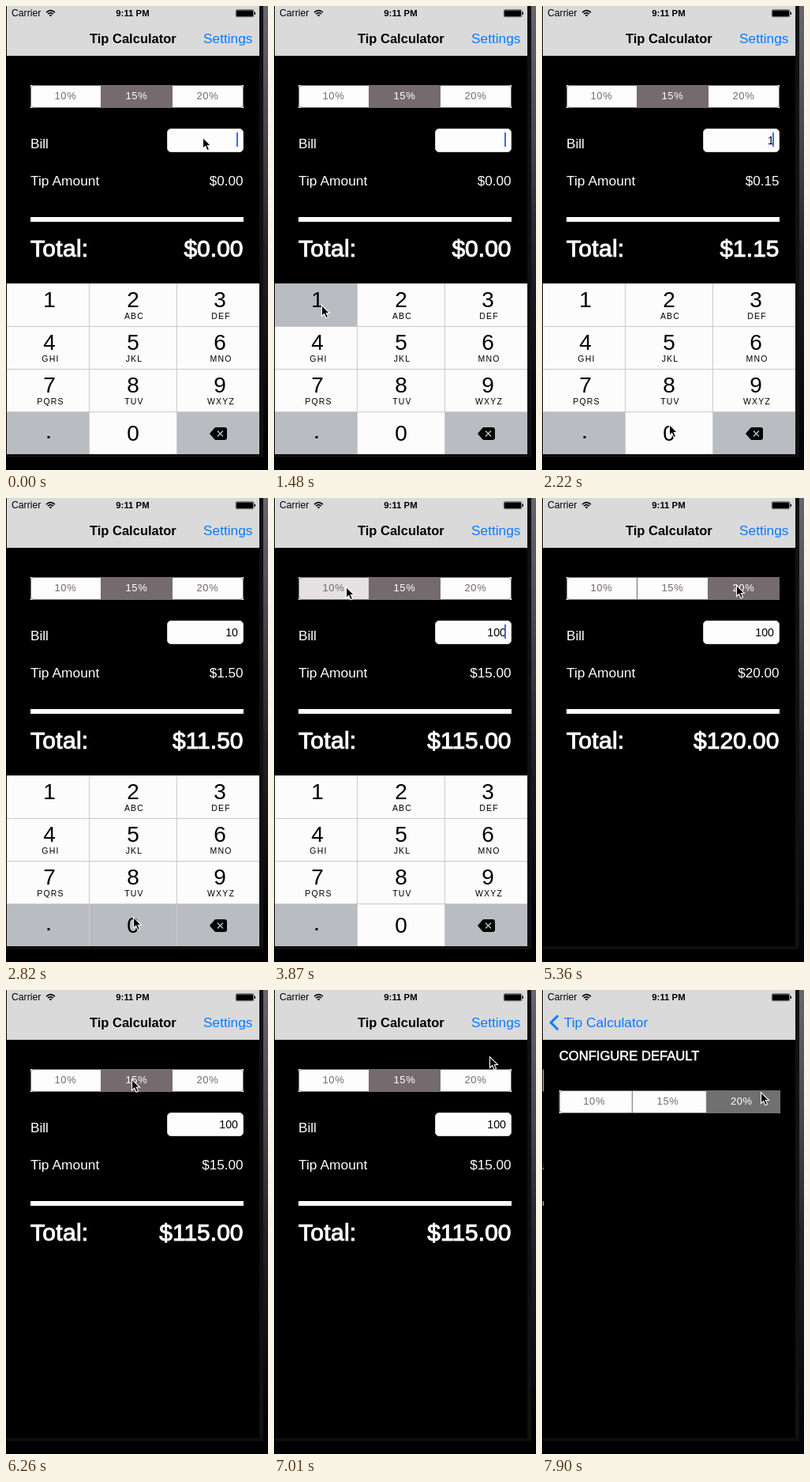
Recreate the animation shown at these times as an HTML page. Size 332x587 px, loop 8 s.

```html
<!DOCTYPE html>
<html lang="en">
<head>
<meta charset="utf-8">
<title>Tip calculator</title>
<style>
  html, body { margin: 0; width: 100%; height: 100%; overflow: hidden; background: #000; }
  svg { display: block; width: 100%; height: 100%; font-family: "Liberation Sans", Arial, sans-serif; }
</style>
</head>
<body>
<svg id="stage" viewBox="0 0 332 587"></svg>
<script>
const LOOP = 8000, STEP = 149, LEAD = 16;
const BLUE = '#0a7aff', KEY_GRAY = '#b9bcc1';
const RATES = [10, 15, 20];

// Pointer path: [step, x, y]
const POINTER = [
  [0, 249, 166], [6, 249, 166], [10, 60, 378], [12, 58, 376], [14, 140, 540], [15, 161, 529],
  [21, 161, 530], [26, 91, 112], [27, 92, 114], [28, 104, 128], [31, 246, 110], [36, 246, 110],
  [40, 158, 112], [44, 160, 113], [47, 273, 84], [49, 283, 46], [51, 284, 48], [53, 277, 129]
];
const TYPED = [[11, '1'], [17, '0'], [20, '0']];
const KEYBOARD_DROP = [[26, 0], [27, 105], [28, 209], [29, 213], [30, 216]];

const mix = (a, b, p) => a + (b - a) * p;
const smooth = p => p * p * (3 - 2 * p);

function along(path, k, ease = p => p) {
  const i = path.findIndex(point => point[0] >= k);
  if (i < 0) return path.at(-1).slice(1);
  if (i === 0) return path[0].slice(1);
  const [from, to] = [path[i - 1], path[i]];
  const p = ease((k - from[0]) / (to[0] - from[0]));
  return from.slice(1).map((v, n) => mix(v, to[n + 1], p));
}

const rect = (x, y, w, h, fill, extra = '') =>
  `<rect x="${x}" y="${y}" width="${w}" height="${h}" fill="${fill}" ${extra}/>`;
const text = (x, y, size, fill, str, extra = '') =>
  `<text x="${x}" y="${y}" font-size="${size}" fill="${fill}" ${extra}>${str}</text>`;
// A medium weight: regular letters thickened by a thin outline
const medium = (x, y, size, fill, str, extra = '') =>
  text(x, y, size, fill, str, `stroke="${fill}" stroke-width="${size * .035}" ${extra}`);
const shift = (x, y, body) => `<g transform="translate(${x} ${y})">${body}</g>`;
const BOLD = 'font-weight="bold"', END = 'text-anchor="end"', MID = 'text-anchor="middle"';

function segments(x, y, cuts, tint, selected, pressed) {
  const width = cuts[3];
  let out = rect(x, y, width, 29, '#fdfdfd');
  RATES.forEach((rate, i) => {
    const on = rate === selected;
    const w = cuts[i + 1] - cuts[i];
    if (on || rate === pressed) out += rect(x + cuts[i], y, w, 29, on ? tint : '#e5e1e3');
    if (i) out += rect(x + cuts[i] - 1, y, 1, 29, tint);
    out += text(x + 44.4 + i * width / 3, y + 18, 13, on ? '#fff' : tint, rate + '%', `${MID} letter-spacing=".6"`);
  });
  return out + rect(x + .5, y + .5, width - 1, 28, 'none', `rx="3.5" stroke="${tint}"`);
}

function calculator(k) {
  const typed = TYPED.filter(([at]) => at <= k);
  const bill = typed.map(([, digit]) => digit).join('');
  const lastKey = typed.length ? typed.at(-1)[0] : 0;
  const rate = k < 27 ? 15 : k < 35 ? 10 : k < 42 ? 20 : 15;
  const pressed = { 26: 10, 34: 20, 41: 15 }[k];
  const caret = k < 27 && Math.floor((k - lastKey + 2) / 3) % 2 === 0;
  const tip = bill * rate / 100;
  const money = v => '$' + v.toFixed(2);
  return segments(31, 100, [0, 90, 180, 270], '#756a6e', rate, pressed)
    + text(31, 180, 17.2, '#fff', 'Bill')
    + rect(204.5, 155.5, 96, 29, '#fdfdfd', 'rx="4.5" stroke="#cfcfcf"')
    + text(294, 175, 14.2, '#000', bill, END)
    + (caret ? rect(292, 160, 2, 18, '#3f6be0') : '')
    + text(31, 227, 17.4, '#fff', 'Tip Amount')
    + text(300.5, 227, 17.1, '#fff', money(tip), END)
    + rect(31, 267, 270, 6, '#fff')
    + medium(31, 317, 30, '#fff', 'Total:', 'letter-spacing=".3"')
    + medium(300.5, 317, 30, '#fff', money(+bill + tip), END);
}

function keyboard(k) {
  const letters = ['', 'ABC', 'DEF', 'GHI', 'JKL', 'MNO', 'PQRS', 'TUV', 'WXYZ'];
  const left = [1, 106, 217], width = [104, 110, 104], centre = [55, 161, 271];
  const down = [10, 11].includes(k) ? 0 : [16, 17, 19, 20].includes(k) ? 10 : -1;
  let out = rect(1, 351, 320, 216, '#c9cacc');
  for (let i = 0; i < 12; i++) {
    const col = i % 3, row = Math.floor(i / 3), y = 351 + row * 54;
    const gray = i === 9 || i === 11 || i === down;
    out += rect(left[col], y + (row ? 1 : 0), width[col], row ? 53 : 54, gray ? KEY_GRAY : '#fcfcfc');
    if (i < 9) {
      out += text(centre[col], y + 30, 28, '#000', i + 1, MID)
        + text(centre[col] + 1.5, y + 45, 10.5, '#000', letters[i], `${MID} letter-spacing="1.2"`);
    }
  }
  return out
    + text(161, 550, 28, '#000', 0, MID)
    + rect(52.5, 544, 3, 3, '#000')
    + '<path d="M258 541l6-7q1-1 2-1h11q3 0 3 3v10q0 3-3 3h-11q-1 0-2-1z"/>'
    + `<path d="M268 537.5l7 7m0-7l-7 7" stroke="${KEY_GRAY}" stroke-width="1.5"/>`;
}

function settings() {
  return rect(1, 63, 320, 504, '#000')
    + medium(21, 89, 16.6, '#fff', 'CONFIGURE DEFAULT')
    + segments(21, 127, [0, 93, 187, 280], '#707070', 20);
}

function bars(k, p) {
  const fade = v => `opacity="${v}"`;
  const titleX = mix(106, 27.5, p);
  return rect(1, 0, 320, 63, '#dadada')
    + text(7, 13.3, 12.2, '#000', 'Carrier')
    + '<g fill="none" stroke="#000" stroke-width="1.6"><path d="M51 8.2q5.5-5 11 0M53 10.2q3.5-3 7 0"/></g>'
    + '<path d="M54.7 11.4q1.8-1.3 3.6 0l-1.8 2z"/>'
    + text(160.5, 13.3, 11.4, '#000', '9:11 PM', `${BOLD} ${MID}`)
    + rect(291.3, 4.8, 22.6, 8.9, 'none', 'rx="1.5" stroke="#000" stroke-width=".6"')
    + rect(292, 5.6, 21, 7.4, '#000', 'rx="1"') + rect(314.5, 7.5, 1.5, 3.5, '#000', 'rx=".7"')
    + text(titleX, 47, 16.5, '#000', 'Tip Calculator', `${BOLD} ${fade(1 - p)}`)
    + text(250, 47, 17.3, BLUE, 'Settings', fade(k === 49 || k === 50 ? .3 : 1 - p))
    + text(titleX, 47, 17.4, BLUE, 'Tip Calculator', fade(p))
    + `<path d="M20.3 32.3l-9 9 9 9" fill="none" stroke="${BLUE}" stroke-width="3" ${fade(p)}/>`;
}

const DEFS = `<defs>
  <clipPath id="screen"><rect x="1" y="0" width="320" height="567"/></clipPath>
  <linearGradient id="edge" x2="0" y2="1">
    <stop stop-color="#66666c"/><stop offset=".25" stop-color="#4a4a50"/>
    <stop offset=".55" stop-color="#222226"/><stop offset="1" stop-color="#000"/>
  </linearGradient></defs>`;

function scene(k) {
  const pushTime = k * STEP - 7508;
  const offset = pushTime < 0 ? 320 : 320 * Math.exp(-pushTime / 65);
  const p = 1 - offset / 320;
  const [drop] = along(KEYBOARD_DROP, k);
  const [x, y] = along(POINTER, k, smooth);
  return DEFS
    + rect(0, 0, 332, 587, '#000')
    + rect(326, 0, 6, 567, 'url(#edge)')
    + rect(321, 0, 5, 571, '#111113') + rect(0, 567, 326, 4, '#0e0e10')
    + '<g clip-path="url(#screen)">' + rect(1, 0, 320, 567, '#000')
    + shift(-96 * p, 0, calculator(k))
    + (drop < 216 ? shift(0, drop, keyboard(k)) : '')
    + (p > 0 ? shift(offset, 0, settings()) : '')
    + bars(k, p) + '</g>'
    + shift(x, y, '<path d="M.5 .5V14.5L3.7 11.5 6 16.8 8.6 15.6 6.3 10.5H10.5Z" stroke="#fff" stroke-width="1.1"/>');
}

const stage = document.getElementById('stage');
let shown = -1;
function draw() {
  const k = Math.floor((performance.now() % LOOP + LEAD) / STEP);
  if (k !== shown) stage.innerHTML = scene(shown = k);
  requestAnimationFrame(draw);
}
draw();
</script>
</body>
</html>
```
